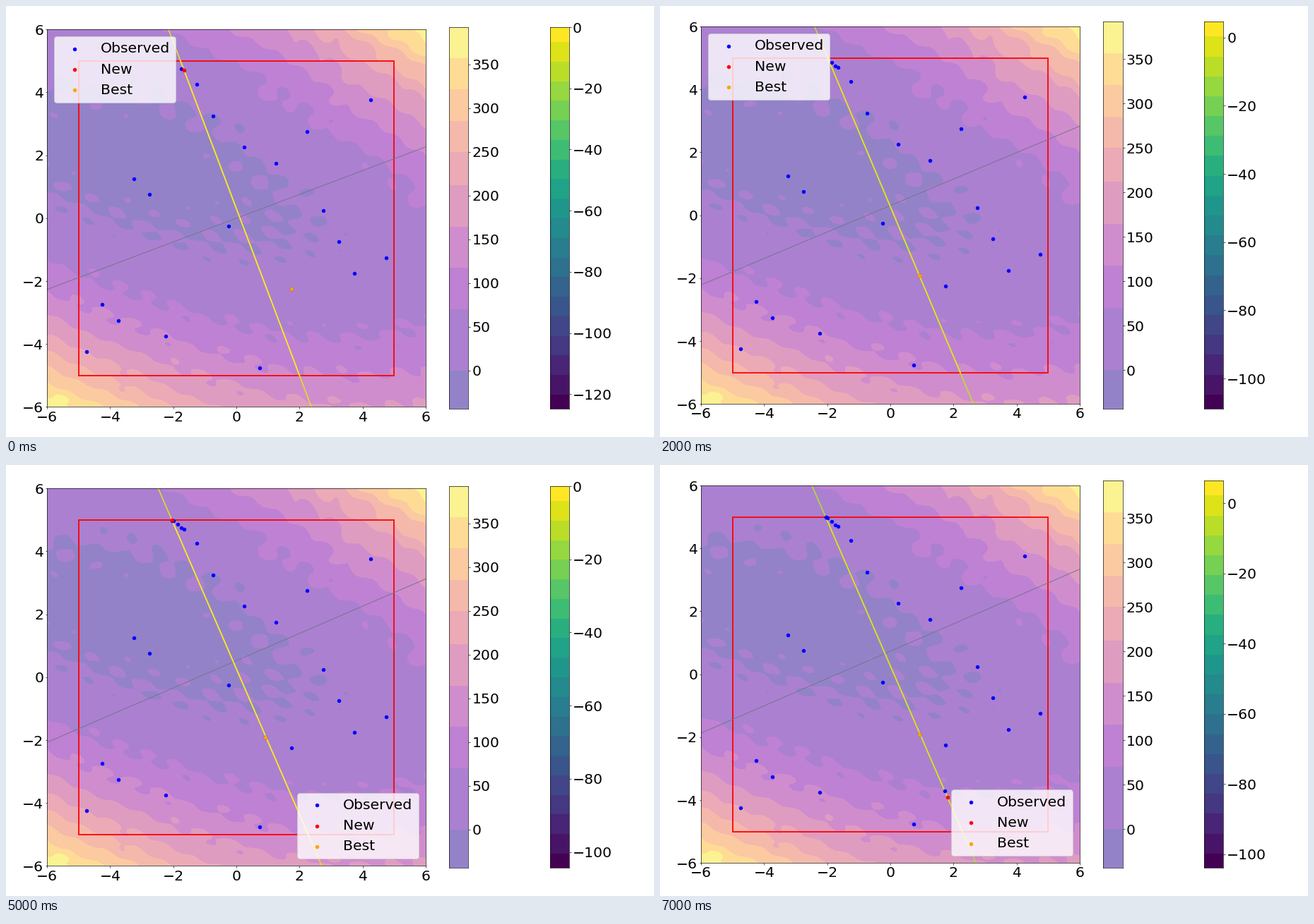
These frames come from a looping animation (917x611 px, 8000 ms). A matplotlib script:

```python
import numpy as np
import matplotlib.pyplot as plt
from matplotlib.animation import FuncAnimation
from matplotlib.colors import ListedColormap, BoundaryNorm
from matplotlib.patches import Rectangle
from matplotlib.ticker import MultipleLocator

W, H, DPI = 917, 611, 72
plt.rcParams.update({"font.family": "DejaVu Sans", "font.size": 20.4,
                     "axes.linewidth": 0.65})
for side in ("xtick", "ytick"):
    plt.rcParams.update({f"{side}.major.size": 2.5, f"{side}.major.pad": 2.5,
                         f"{side}.major.width": 0.65})

LEVELS = np.r_[-43.6, 0, np.linspace(70, 212, 4), np.linspace(250, 392.5, 5)]
PLASMA = plt.get_cmap("plasma")
VIRIDIS = plt.get_cmap("viridis")

# Latin hypercube: row taken in each of the 20 columns
ROWS = np.array([1, 4, 3, 12, 11, 2, 19, 18, 16, 9,
                 14, 0, 13, 5, 15, 10, 8, 6, 17, 7])
START = np.column_stack([np.arange(20), ROWS]) / 2 - 4.75
DIPS = {2: -1.92, 6: -3.7, 7: -3.9}  # samples taken low on the main line
BEST_STEP = 2


def slack(k):
    """How far the fitted direction is from settling."""
    return 0.34 * np.exp(-0.7 * k)


def main_x(k, y):
    """x of the main line at height y; it turns about (0.115, 0)."""
    return 0.115 - (2.605 - slack(k)) * np.asarray(y) / 6


def cross_y(k, x):
    """The perpendicular line, which climbs with a growing wobble."""
    return 0.13 * k + 0.025 * k * (-1) ** k + (2.605 - slack(k)) * x / 6


def sample(k):
    y = DIPS.get(k, 5 - 0.9 * slack(k))
    return float(main_x(k, y)), y


def bump(x, y, cx, cy, r, h):
    return h * np.exp(-((x - cx) ** 2 + (y - cy) ** 2) / r ** 2)


def landscape(x, y):
    valley = 0.65 - 0.31 * x
    z = 5.7 * (y - valley) ** 2 + 0.75 * x ** 2 + 5 * x - 12
    z -= (1 - (x / 6) ** 2) * y ** 2
    z += 1.4 * np.maximum(x, 0) * np.maximum(y, 0)
    # ripples along and across the valley, wider above it
    a = 0.43
    u = x * np.cos(a) - y * np.sin(a)
    v = x * np.sin(a) + y * np.cos(a)
    s = np.where(v > 0.8, 0.64 + v * 1.2, 2 * v)
    z += 7 * np.sin(2 * np.pi * (u / 0.95 + 0.2 * np.sin(2.1 * v)))
    z += 8 * np.sin(2 * np.pi * s + 0.9 * np.sin(1.7 * u))
    z += bump(x, y, 5.45, 0.4, 0.3, 18) + bump(x, y, 1, 3.8, 0.4, 16)
    return np.clip(z, LEVELS[0] + 0.1, LEVELS[-1] - 0.1)


def place(axes, x, top, w, h):
    axes.set_position([x / W, 1 - (top + h) / H, w / W, h / H])


def bar(axes, edges, cmap, step):
    axes.pcolormesh([0, 1], edges, np.arange(len(edges) - 1)[:, None],
                    cmap=cmap)
    axes.set_xlim(0, 1)
    axes.set_ylim(edges[0], edges[-1])
    axes.set_xticks([])
    axes.yaxis.tick_right()
    axes.yaxis.set_major_locator(MultipleLocator(step))


fig = plt.figure(figsize=((W + 0.01) / DPI, (H + 0.01) / DPI), dpi=DPI,
                 facecolor="white")
ax, left, right = (fig.add_axes([x, 0.1, 0.1, 0.8]) for x in (0.1, 0.7, 0.85))

gx, gy = np.meshgrid(np.linspace(-6, 6, 450), np.linspace(-6, 6, 450))
n = len(LEVELS) - 1
shades = ListedColormap(0.5 + 0.5 * PLASMA((np.arange(n) + 0.5) / n))
ax.contourf(gx, gy, landscape(gx, gy), levels=LEVELS, cmap=shades,
            norm=BoundaryNorm(LEVELS, n), antialiased=False)
ax.set_xlim(-6, 6)
ax.set_ylim(-6, 6)
for axis in (ax.xaxis, ax.yaxis):
    axis.set_major_locator(MultipleLocator(2))
bar(left, LEVELS, shades, 50)

ax.add_patch(Rectangle((-5, -5), 10, 10, fill=False, ec="red", lw=1.8,
                       zorder=2))
cross, = ax.plot([], [], color="#75758a", lw=1, zorder=2)
outer, = ax.plot([], [], lw=1.6, zorder=2.1)
inner, = ax.plot([], [], lw=1.6, zorder=2.2)


def dots(color, label, z):
    return ax.scatter([0], [0], s=20, c=color, label=label, zorder=z)


seen = dots("blue", "Observed", 3)
fresh = dots("red", "New", 3.1)
best = dots("orange", "Best", 3.2)


def update(k):
    tall = k % 5 == 2
    place(ax, 58.2, 29 if tall else 33.1, 535.6, 535.4)
    top, height = (22, 549) if tall else (30, 541)
    for axes, x in ((left, 627.3), (right, 769.8)):
        place(axes, x, top, height / 20, height)

    low = -103.7 - 62 * slack(k)
    high = 4 + 0.35 * k if tall else 0
    right.clear()
    # 20 shades with shorter ones at both ends
    steps = np.r_[0, np.linspace(0.037, 0.961, 19), 1]
    bar(right, low + steps * (high - low),
        ListedColormap(VIRIDIS(np.linspace(0, 1, 20))), 20)

    for line, reach, value in ((outer, 6, -6), (inner, 5, 0)):
        ends = np.array([reach, -reach])
        line.set_data(main_x(k, ends), ends)
        line.set_color(VIRIDIS(float((value - low) / (high - low))))
    cross.set_data([-6, 6], [cross_y(k, -6), cross_y(k, 6)])

    seen.set_offsets(np.vstack([START] + [sample(i) for i in range(k)]))
    fresh.set_offsets([sample(k)])
    best.set_offsets([sample(BEST_STEP) if k >= BEST_STEP else START[13]])
    ax.legend(handles=[seen, fresh, best],
              loc="upper left" if k < 3 else "lower right").set_zorder(5)
    return []


anim = FuncAnimation(fig, update, frames=8, interval=1000, repeat=True,
                     repeat_delay=0, init_func=lambda: update(0), blit=False)
plt.show()
```
